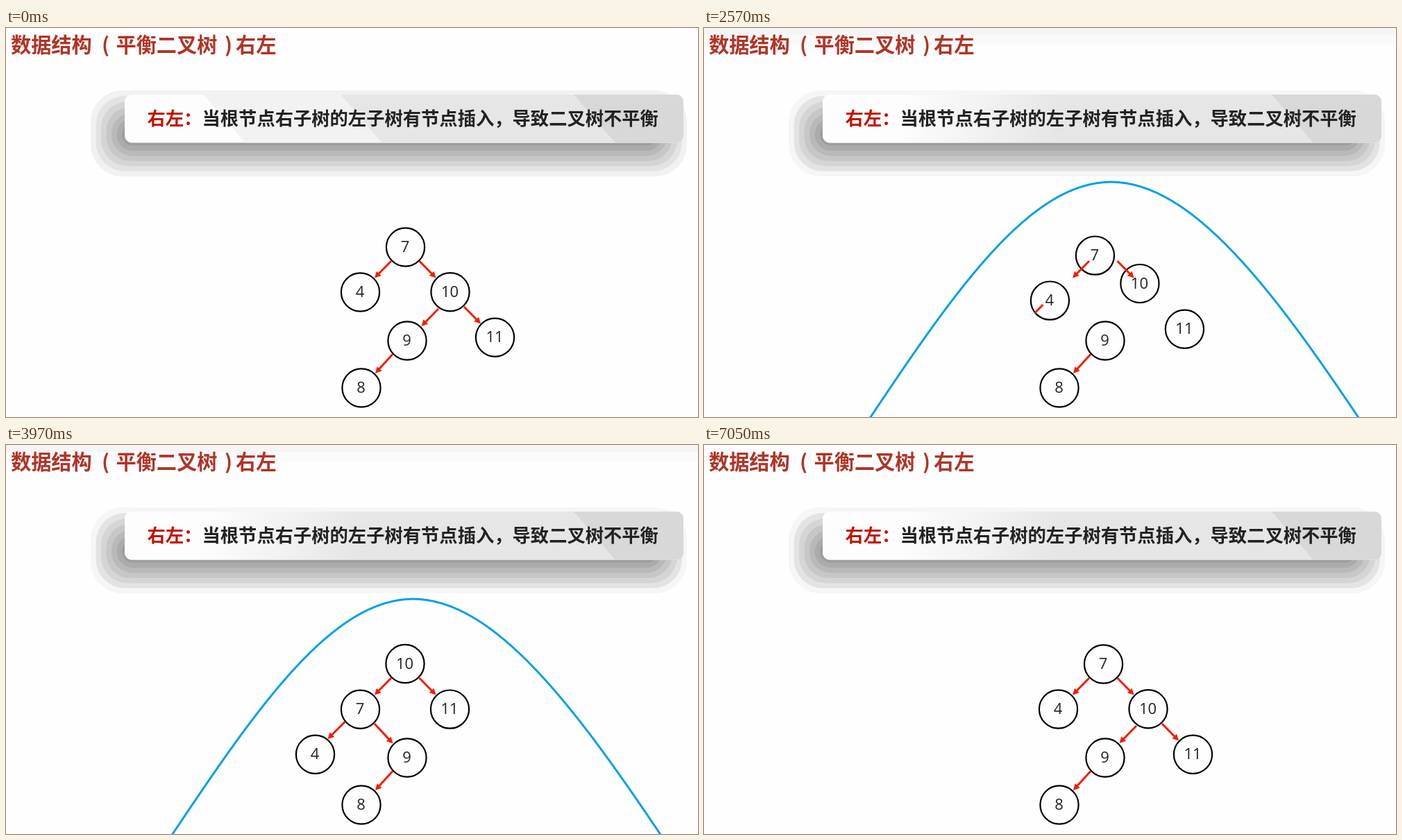
An HTML page with a canvas that plays this animation: 997x561 px, repeating every 8 s.

```html
<!DOCTYPE html>
<html lang="zh-CN">
<head>
<meta charset="utf-8">
<title>平衡二叉树</title>
<style>
  html, body { margin: 0; width: 100%; height: 100%; overflow: hidden; background: #fefefe; }
  canvas { display: block; width: 997px; height: 561px; }
</style>
</head>
<body>
<canvas id="stage" width="997" height="561"></canvas>
<script>
const ctx = document.getElementById('stage').getContext('2d');
const LOOP = 8000, CURVE_IN = 1670, ROTATE = 2510, DONE = 2990, RESET = 7050;
const CJK = '"Noto Sans CJK SC", "Noto Sans CJK", sans-serif';
const RED = '#f41c00';

// value, start x and y, direction of vertical travel during the rotation
const nodes = [
  [7, 575.5, 316, 1], [4, 510.5, 381, 1], [10, 640, 380.7, -1],
  [11, 704.5, 446.3, -1], [9, 578, 451, 0], [8, 512, 519, 0]
];
const arrows = {
  rootLeft: [555, 336, 531, 360.5], rootRight: [595.5, 336, 619.5, 360.5],
  tenNine: [623, 405, 598.5, 430], tenEleven: [660, 402, 684, 426.5],
  nineEight: [557, 470.5, 532, 498],
  sevenFour: [488.5, 399, 463.5, 424], sevenNine: [531, 402, 557.5, 430.5]
};

const clamp = v => Math.max(0, Math.min(1, v));
const hold = (t, from, step) => from + Math.floor((t - from) / step + 1e-6) * step;
const ease = u => (1 - Math.cos(Math.PI * clamp(u))) / 2;

function text(str, x, y, font, color, align = 'left') {
  ctx.font = font;
  ctx.fillStyle = color;
  ctx.textAlign = align;
  ctx.fillText(str, x, y);
}

function box(l, t, r, b, radius, fill) {
  ctx.beginPath();
  ctx.roundRect(l, t, r - l, b - t, radius);
  ctx.fillStyle = fill;
  ctx.fill();
}

function drawTitle() {
  const parts = [['数据结构', 7], ['(', 138], ['平衡二叉树', 158.5], [')', 315], ['右左', 331]];
  for (const [s, x] of parts) text(s, x, 35, 'bold 29.2px ' + CJK, '#b03427');
}

function drawCard(smooth) {
  for (let i = 0; i < 7; i++) {
    const g = i || !smooth ? 241 - 14 * i : 246;
    box(122 + 7.5 * i, 90 + 8 * i, 981 - 7 * i, 214 - 7.4 * i, 46 - 4 * i, `rgb(${g},${g},${g})`);
  }
  ctx.save();
  box(171, 96, 976, 165.5, 10, '#fdfdfd');
  ctx.clip();
  const band = (x, color) => {
    ctx.beginPath();
    ctx.moveTo(x, 96);
    ctx.lineTo(980, 96);
    ctx.lineTo(980, 166);
    ctx.lineTo(x + 60, 166);
    ctx.fillStyle = color;
    ctx.fill();
  };
  if (smooth) {
    const g = ctx.createLinearGradient(290, 96, 510, 140);
    g.addColorStop(0, '#fdfdfd');
    g.addColorStop(0.5, '#f2f2f2');
    g.addColorStop(1, '#e6e6e6');
    ctx.fillStyle = g;
    ctx.fillRect(171, 96, 805, 70);
  } else {
    band(285, '#f2f2f2');
    band(482, '#e6e6e6');
  }
  band(818, '#d8d8d8');
  ctx.restore();

  const font = 'bold 26.3px ' + CJK;
  text('右左：', 203.5, 139.5, font, '#c41200');
  text('当根节点右子树的左子树有节点插入，导致二叉树不平衡', 282.5, 139.5, font, '#222');
}

function drawStrip() {
  ctx.fillStyle = '#fafafa';
  ctx.fillRect(0, 10, 997, 14);
  ctx.fillStyle = '#f5f5f5';
  ctx.fillRect(0, 0, 997, 10);
}

function drawCurve(t) {
  const edge = 920 - 740 * clamp((hold(t, CURVE_IN, 47.5) - CURVE_IN) / 190);
  const g = ctx.createLinearGradient(edge, 0, edge + 50, 0);
  g.addColorStop(0, 'rgba(0,160,233,0)');
  g.addColorStop(1, 'rgb(0,160,233)');
  ctx.beginPath();
  ctx.moveTo(238, 564);
  ctx.bezierCurveTo(362, 378, 470, 222, 586.5, 222);
  ctx.bezierCurveTo(703, 222, 820, 378, 944.5, 564);
  ctx.strokeStyle = g;
  ctx.lineWidth = 3;
  ctx.stroke();
}

function drawNode([value, x, y, dir], p) {
  if (dir) {
    x -= 65 * p;
    y += 65.2 * p * dir;
  }
  ctx.beginPath();
  ctx.arc(x, y, 27.6, 0, 2 * Math.PI);
  ctx.fillStyle = '#fefefe';
  ctx.fill();
  ctx.strokeStyle = '#000';
  ctx.lineWidth = 2.2;
  ctx.stroke();
  text(value, x - 0.5, y + 7, '22px "Open Sans", "Noto Sans", sans-serif', '#222', 'center');
}

// shown: part of the arrow uncovered, starting at its tail
function drawArrow([x1, y1, x2, y2], shown = 1) {
  if (shown <= 0) return;
  const len = Math.hypot(x2 - x1, y2 - y1);
  ctx.save();
  if (shown < 1) {
    const dir = Math.sign(x2 - x1);
    ctx.beginPath();
    ctx.rect(x1 - 2 * dir, 0, (x2 - x1) * shown + 2 * dir, 561);
    ctx.clip();
  }
  ctx.translate(x1, y1);
  ctx.rotate(Math.atan2(y2 - y1, x2 - x1));
  ctx.fillStyle = RED;
  ctx.fillRect(0, -1.5, len - 7, 3);
  ctx.beginPath();
  ctx.moveTo(len, 0);
  ctx.lineTo(len - 9, -4.7);
  ctx.lineTo(len - 9, 4.7);
  ctx.fill();
  ctx.restore();
}

function draw(t) {
  const a = arrows;
  const rotating = t >= ROTATE && t < RESET;
  const s = Math.min(hold(t, ROTATE, 48), DONE);
  const p = rotating ? ease((s - 2407) / 532) : 0;

  ctx.fillStyle = '#fefefe';
  ctx.fillRect(0, 0, 997, 561);
  if (t >= CURVE_IN && t < 5420) drawStrip();
  drawTitle();
  drawCard(t >= 2050);
  if (t >= CURVE_IN && t < RESET) drawCurve(t);

  for (const n of nodes) drawNode(n, p);
  for (const arrow of [a.rootLeft, a.rootRight, a.nineEight]) drawArrow(arrow);
  if (rotating) {
    drawArrow(a.sevenFour, clamp((s - ROTATE) / 100));
    drawArrow(a.sevenNine, clamp((s - 2890) / 100));
  } else {
    drawArrow(a.tenNine);
    drawArrow(a.tenEleven);
  }
}

const start = performance.now();
function frame() {
  draw((performance.now() - start) % LOOP);
  requestAnimationFrame(frame);
}
frame();
</script>
</body>
</html>
```
